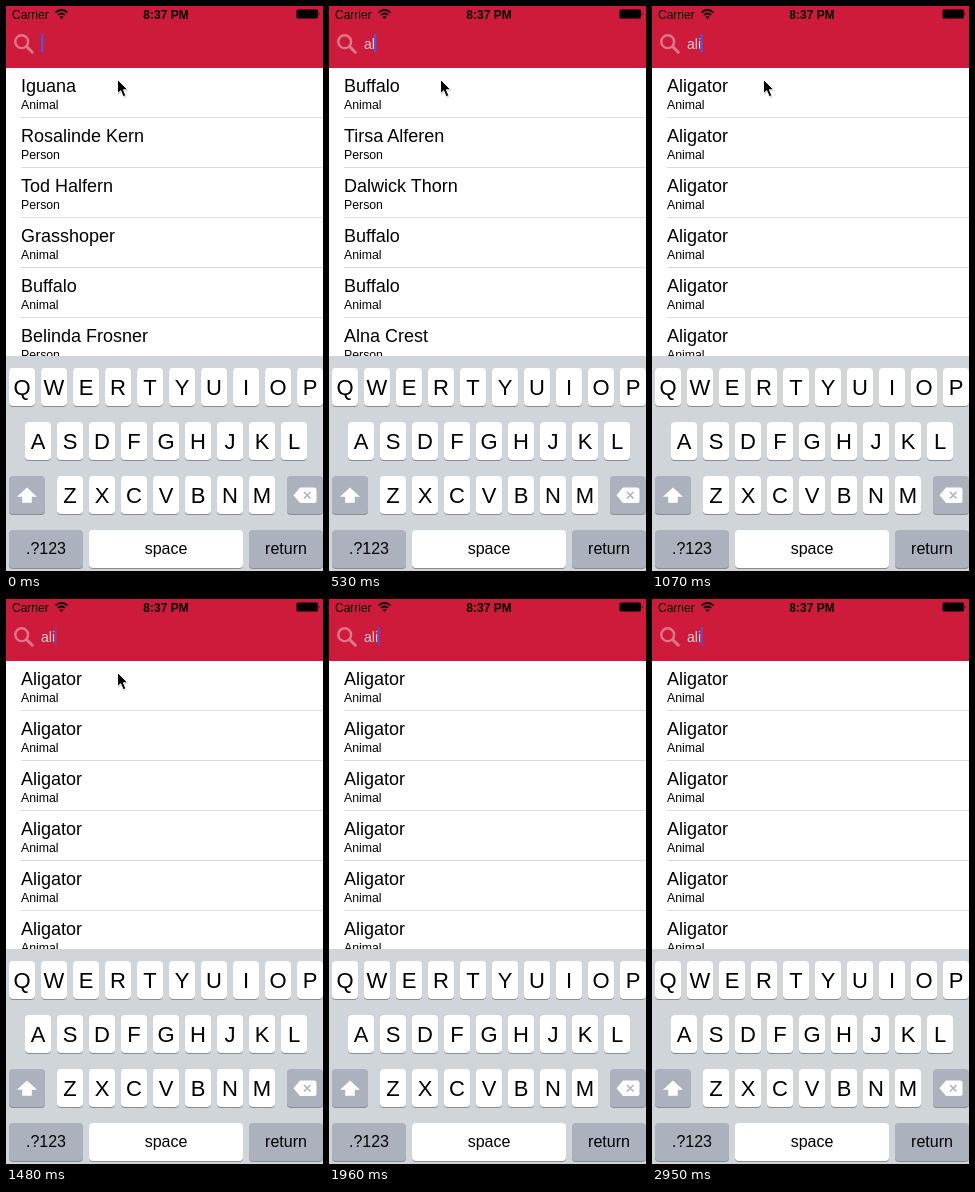
Write an HTML page that moves like this. It is 317x565 px and loops after 3 s.

```html
<!DOCTYPE html>
<html lang="en">
<head>
<meta charset="utf-8">
<title>Live search</title>
<style>
  html, body { margin: 0; width: 100%; height: 100%; overflow: hidden; background: #fff; }
  svg { display: block; width: 317px; height: 565px; font-family: "Liberation Sans", Arial, sans-serif; }
  .title { font-size: 18px; }
  .kind { font-size: 12.3px; }
  .status { font-size: 12px; }
  .query { font-size: 14px; fill: #f3d0d7; }
  .letter { font-size: 22px; text-anchor: middle; }
  .word { font-size: 16px; text-anchor: middle; }
</style>
</head>
<body>
<svg id="stage" viewBox="0 0 317 565">
  <rect width="317" height="565" fill="#fff"/>
  <g id="list"></g>

  <rect width="317" height="62" fill="#ce1a3b"/>
  <text class="status" x="6" y="12.5">Carrier</text>
  <g fill="none" stroke="#000" stroke-width="1.8">
    <path d="M49.6 6.6a8 8 0 0 1 11.8 0M52 9a4.8 4.8 0 0 1 7 0"/>
    <path d="M55.5 13l-2-2.1a2.8 2.8 0 0 1 4 0z" fill="#000" stroke="none"/>
  </g>
  <text class="status" x="160" y="12.5" text-anchor="middle" font-weight="bold">8:37 PM</text>
  <rect x="290.5" y="3.5" width="21.5" height="9" rx="1.5"/>
  <path d="M312.7 6.2q1.6 1.8 0 3.6z"/>
  <g fill="none" stroke="#e0768a" stroke-linecap="round">
    <circle cx="15.7" cy="35.7" r="6.4" stroke-width="2.4"/>
    <path d="M21 41l5.3 5.3" stroke-width="3"/>
  </g>
  <text class="query" id="query" x="35" y="42.5"></text>
  <rect id="caret" y="28" width="2" height="18.5" fill="#405eec"/>

  <rect y="350" width="317" height="215" fill="#d0d5d9"/>
  <g id="keys"></g>
  <path d="M21 481.5l10 9.3h-5.2v6h-9.6v-6H11z" fill="#fff"/>
  <path d="M294 481.5h14a2.5 2.5 0 0 1 2.5 2.5v10.5a2.5 2.5 0 0 1-2.5 2.5h-14l-6.5-7.7z" fill="#fff"/>
  <path d="M298 486l6.5 6.5m0-6.5l-6.5 6.5" stroke="#abb1bd" stroke-width="1.5"/>

  <g id="pointer">
    <path d="M0 0v14.2l3.2-3 2.5 6 2.7-1.1-2.5-5.8h4.5z" transform="translate(.6 1.3)" fill="#000" opacity=".2"/>
    <path d="M0 0v14.2l3.2-3 2.5 6 2.7-1.1-2.5-5.8h4.5z" stroke="#fff" stroke-width="1"/>
  </g>
</svg>
<script>
const LOOP = 3000;
const $ = id => document.getElementById(id);

function add(parent, tag, attrs, text = "") {
  const el = document.createElementNS("http://www.w3.org/2000/svg", tag);
  for (const name in attrs) el.setAttribute(name, attrs[name]);
  el.textContent = text;
  parent.append(el);
  return el;
}

// Keyboard
function key(x, y, w, label, cls = "letter", fill = "#fff") {
  const box = { x, width: w, height: 38, rx: 4 };
  add($("keys"), "rect", { ...box, y: y + 1, fill: "#898d92" });
  add($("keys"), "rect", { ...box, y, fill });
  const drop = cls === "letter" ? 27 : 24;
  add($("keys"), "text", { class: cls, x: x + w / 2, y: y + drop }, label);
}
[["QWERTYUIOP", 3, 362], ["ASDFGHJKL", 19, 416], ["ZXCVBNM", 51, 470]].forEach(([row, x, y]) =>
  [...row].forEach((c, i) => key(x + 32 * i, y, 26, c)));
const GRAY = "#abb1bd";
key(3, 470, 36, "", "word", GRAY);
key(281, 470, 36, "", "word", GRAY);
key(3, 524, 74, ".?123", "word", GRAY);
key(83, 524, 154, "space", "word");
key(243, 524, 74, "return", "word", GRAY);

// Results: an entry with a space is a person
const animals = new Array(6).fill("Aligator");
const results = [
  [0, ["Iguana", "Rosalinde Kern", "Tod Halfern", "Grasshoper", "Buffalo", "Belinda Frosner"]],
  [530, ["Buffalo", "Tirsa Alferen", "Dalwick Thorn", "Buffalo", "Buffalo", "Alna Crest"]],
  [1070, animals]
];
const rows = animals.map((_, i) => {
  const y = 62 + 50 * i;
  add($("list"), "rect", { x: 15, y: y + 49, width: 302, height: 1, fill: "#dcdcde" });
  return {
    title: add($("list"), "text", { class: "title", x: 15, y: y + 24 }),
    kind: add($("list"), "text", { class: "kind", x: 15, y: y + 40.5 })
  };
});

// Step tables: [time, value]
const typing = [[0, ["", 35.2]], [230, ["a", 42.6]], [350, ["al", 45.2]], [890, ["ali", 48.6]]];
const blink = [
  [0, 1], [1420, .75], [1480, .5], [1540, .25], [1600, 0],
  [1840, .25], [1900, .5], [1960, .75], [2010, 1],
  [2430, .75], [2490, .5], [2550, .25], [2610, 0],
  [2890, .4], [2950, .8]
];
const away = [0, 600];
const path = [
  [0, [111.5, 73.5]], [1780, [70.5, 358.5]], [1840, [138, 530]], [1900, away],
  [2670, [284, 552]], [2720, away]
];

const at = (steps, t) => steps.findLast(([time]) => time <= t)[1];

let shown;
function draw(t) {
  const list = at(results, t);
  if (list !== shown) {
    shown = list;
    rows.forEach((row, i) => {
      row.title.textContent = list[i];
      row.kind.textContent = list[i].includes(" ") ? "Person" : "Animal";
    });
  }
  const [text, x] = at(typing, t);
  $("query").textContent = text;
  $("caret").setAttribute("x", x);
  $("caret").setAttribute("opacity", at(blink, t));
  $("pointer").setAttribute("transform", `translate(${at(path, t)})`);
}

const start = performance.now();
function tick() {
  draw((performance.now() - start) % LOOP);
  requestAnimationFrame(tick);
}
tick();
</script>
</body>
</html>
```
